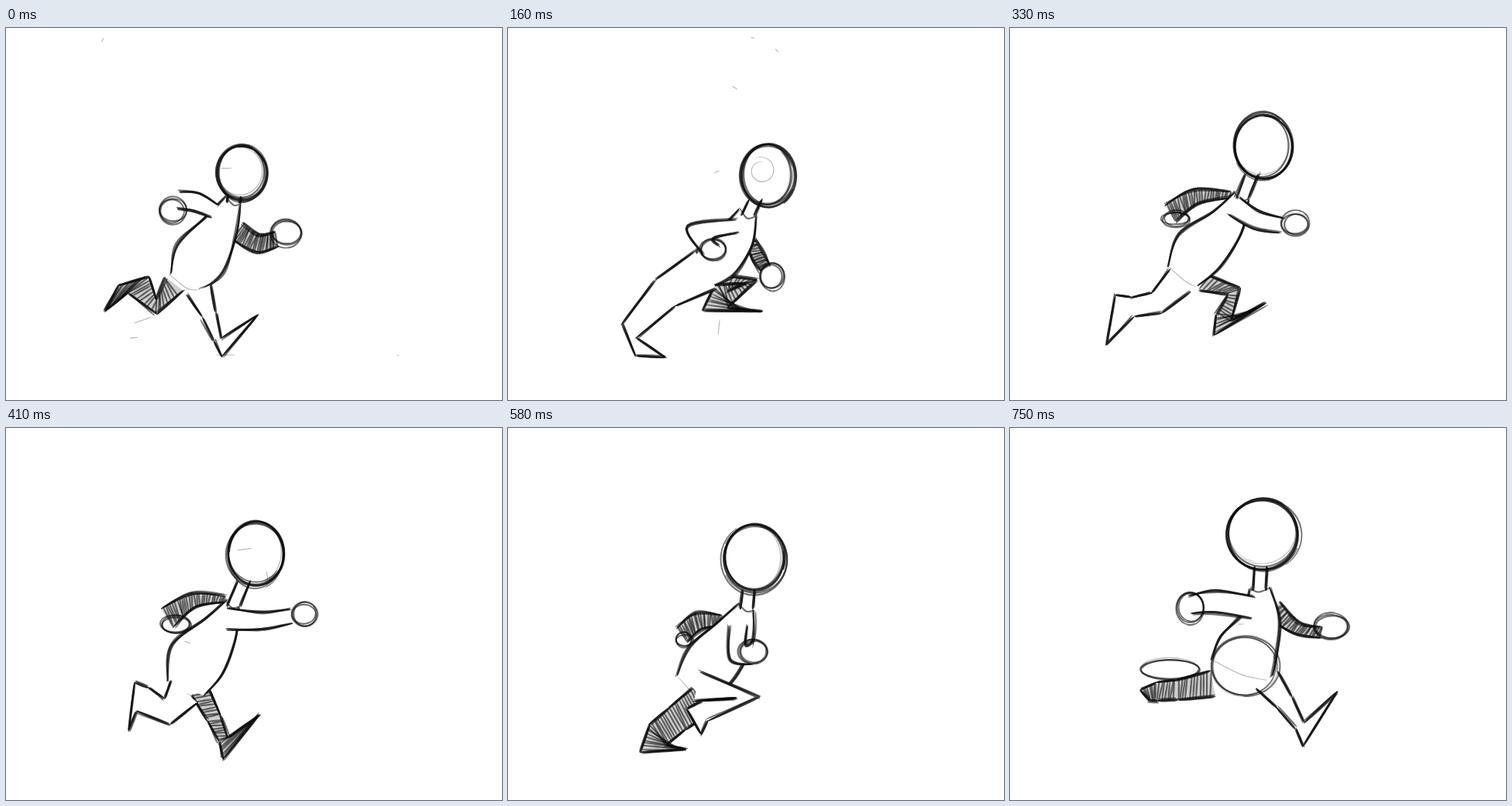
Recreate the animation shown at these times as an HTML page. Size 640x480 px, loop 830 ms.

```html
<!DOCTYPE html>
<html lang="en">
<head>
<meta charset="utf-8">
<title>Sketch run</title>
<style>
html, body { margin: 0; width: 100%; height: 100%; overflow: hidden; background: #fff; }
svg { display: block; width: 100vw; height: 100vh; }
</style>
</head>
<body>
<svg id="stage" viewBox="0 0 640 480"></svg>
<script>
const NS = 'http://www.w3.org/2000/svg';
const stage = document.getElementById('stage');
const BOLD = [3.2, .8], MID = [2.3, .58], THIN = [1.2, .3];

let seed = 7;
const rand = () => (seed = seed * 16807 % 2147483647) / 2147483647;
const wob = a => (rand() * 2 - 1) * a;
const mix = (a, b, t) => a + (b - a) * t;
const mid = (p, q, t) => [mix(p[0], q[0], t), mix(p[1], q[1], t)];
const toPath = pts => 'M' + pts.map(p => p[0].toFixed(1) + ' ' + p[1].toFixed(1)).join('L') + 'Z';

function add(parent, tag, attrs) {
  const el = document.createElementNS(NS, tag);
  for (const k in attrs) el.setAttribute(k, attrs[k]);
  return parent.appendChild(el);
}

function unit(p, q) {
  const dx = q[0] - p[0], dy = q[1] - p[1], len = Math.hypot(dx, dy) || 1;
  return [dx / len, dy / len];
}

// Catmull-Rom curve through the points.
function curve(p) {
  const out = [], at = i => p[Math.max(0, Math.min(p.length - 1, i))];
  for (let i = 0; i < p.length - 1; i++) {
    const [a, b, c, d] = [at(i - 1), at(i), at(i + 1), at(i + 2)];
    for (let s = 0; s < 8; s++) {
      const t = s / 8;
      out.push([0, 1].map(k => b[k] + .5 * t * (c[k] - a[k]
        + t * (2 * a[k] - 5 * b[k] + 4 * c[k] - d[k]
        + t * (3 * (b[k] - c[k]) + d[k] - a[k])))));
    }
  }
  out.push(at(p.length));
  return out;
}

// Tapered ink line.
function ink(g, pts, [w, alpha]) {
  const n = pts.length - 1, left = [], right = [];
  pts.forEach(([x, y], i) => {
    const [dx, dy] = unit(pts[Math.max(0, i - 1)], pts[Math.min(n, i + 1)]);
    const r = w / 2 * (.35 + .65 * Math.sqrt(Math.sin(Math.PI * i / n) + 1e-9));
    left.push([x - dy * r, y + dx * r]);
    right.unshift([x + dy * r, y - dx * r]);
  });
  add(g, 'path', { d: toPath(left.concat(right)), fill: '#0c0c0c', 'fill-opacity': alpha });
}

const pass = (g, pts, pen, j) => ink(g, curve(pts.map(([x, y]) => [x + wob(j), y + wob(j)])), pen);

function sketch(g, pts) {
  pass(g, pts, BOLD, .4);
  pass(g, pts, MID, 2);
  pass(g, pts, MID, 2.8);
}

function ring(g, [cx, cy, rx, ry], pens) {
  for (const pen of pens) {
    const x = cx + wob(1.6), y = cy + wob(1.6), start = rand() * 6.28;
    const a = rx + wob(2.2), b = ry + wob(2.2), pts = [];
    for (let s = 0; s <= 48; s++) {
      const t = start + s / 7, k = 1 + (s - 24) / 1000;
      pts.push([x + a * k * Math.cos(t), y + b * k * Math.sin(t)]);
    }
    ink(g, pts, pen);
  }
}

// Both edges of a tapering limb given as x, y, width per joint.
function edges(v) {
  const joints = [], back = [], front = [];
  for (let i = 0; i < v.length; i += 3) joints.push(v.slice(i, i + 3));
  joints.forEach((p, i) => {
    const before = i ? unit(joints[i - 1], p) : [0, 0];
    const after = joints[i + 1] ? unit(p, joints[i + 1]) : [0, 0];
    const [dx, dy] = unit([0, 0], [before[0] + after[0], before[1] + after[1]]);
    const r = p[2] / 2;
    back.push([p[0] - dy * r, p[1] + dx * r]);
    front.push([p[0] + dy * r, p[1] - dx * r]);
  });
  return [back, front];
}

function shade(g, a, b) {
  add(g, 'path', { d: toPath(a.concat([...b].reverse())), fill: '#222', 'fill-opacity': .22 });
  for (let i = 0; i < a.length - 1; i++) {
    const n = 3 + Math.round(Math.hypot(a[i + 1][0] - a[i][0], a[i + 1][1] - a[i][1]) / 6);
    for (let s = 0; s < n; s++) {
      const p = mid(a[i], a[i + 1], s / n), q = mid(b[i], b[i + 1], Math.min(1, (s + 1.6) / n));
      pass(g, [p, q], MID, 1.4);
    }
  }
}

const cover = (g, pts) => add(g, 'path', { d: toPath(pts), fill: '#fff' });

function arm(g, v, hand, dark) {
  const [a, b] = edges(v).map(curve);
  if (dark) {
    const thin = pts => pts.filter((p, i) => i % 4 === 0);
    shade(g, thin(a), thin(b));
  } else {
    cover(g, a.concat([...b].reverse()));
  }
  edges(v).forEach(e => sketch(g, e));
  ring(g, hand, [MID, MID, MID]);
}

function leg(g, v, foot, dark) {
  const [a, b] = edges(v), heel = foot.slice(0, 2), toe = foot.slice(2);
  const sole = [a[2], heel, toe, b[2]];
  if (dark) {
    shade(g, a, b);
    shade(g, [a[2], heel], [b[2], toe]);
  } else {
    cover(g, [...a, heel, toe, ...[...b].reverse()]);
  }
  [a, b, sole].forEach(line => line.slice(1).forEach((p, i) => sketch(g, [line[i], p])));
}

function torso(g, v, head) {
  const [a, b] = edges(v);
  cover(g, curve(a).concat(curve(b).reverse()));
  sketch(g, a);
  sketch(g, b);
  pass(g, [a[3], [(a[3][0] + b[3][0]) / 2, (a[3][1] + b[3][1]) / 2 + 6], b[3]], THIN, 2);
  const [dx, dy] = unit(v, head);
  const top = [head[0] - dx * head[2] * .96, head[1] - dy * head[3] * .96];
  for (const side of [-8, 8]) sketch(g, [[top[0] + side, top[1] - 2], [v[0] + side, v[1] + 4]]);
  pass(g, [a[0], [v[0], v[1] + 6], b[0]], MID, 1.5);
}

function figure(p) {
  const g = add(stage, 'g', { display: 'none' });
  arm(g, p.farArm, p.farHand, true);
  leg(g, p.farLeg, p.farFoot, true);
  torso(g, p.torso, p.head);
  leg(g, p.leg, p.foot, false);
  arm(g, p.arm, p.hand, false);
  const [x, y, rx, ry] = p.head;
  ring(g, p.head, [BOLD, MID, MID, MID]);
  ring(g, [x - 1, y - 2, rx - 3, ry - 3], [MID, THIN]);
  (p.rings || []).forEach(r => ring(g, r, [MID, THIN, MID]));
  (p.ticks || []).forEach(([tx, ty, dx, dy]) => pass(g, [[tx, ty], [tx + dx, ty + dy]], THIN, .2));
  if (p.swirl) {
    const pts = [];
    for (let t = 0; t < 7; t += .3) pts.push([327 + (18 - t) * Math.cos(t - 2), 184 + (18 - t) * Math.sin(t - 2)]);
    ink(g, pts, THIN);
  }
  return g;
}

function between(p, q) {
  const out = {};
  for (const k in p) {
    if (q[k] && typeof p[k][0] === 'number') out[k] = p[k].map((n, i) => mix(n, q[k][i], .5));
  }
  return out;
}

const strideA = {
  head: [304, 186, 32, 36], torso: [293, 222, 22, 277, 256, 46, 250, 297, 68, 232, 328, 44],
  arm: [270, 237, 18, 246, 225, 24, 222, 222, 22], hand: [215, 235, 17, 16],
  farArm: [299, 262, 26, 325, 278, 24, 349, 272, 20], farHand: [362, 264, 19, 17],
  leg: [249, 338, 33, 262, 370, 18, 273, 402, 10], foot: [279, 424, 325, 370],
  farLeg: [217, 330, 28, 194, 360, 18, 171, 331, 34], farFoot: [145, 332, 128, 365],
  ticks: [[126, 13, -3, 5], [277, 181, 14, 0], [165, 381, 23, -8], [160, 400, 10, -1], [271, 422, 24, 0], [505, 422, 2, 1]]
};
const pushA = {
  head: [335, 191, 35, 39], torso: [309, 238, 24, 296, 268, 46, 272, 298, 56, 250, 316, 46],
  arm: [296, 255, 16, 248, 264, 36, 262, 287, 22], hand: [264, 286, 16, 13],
  farArm: [313, 274, 12, 322, 295, 16, 332, 310, 14], farHand: [340, 320, 14, 16],
  leg: [255, 312, 56, 203, 342, 42, 156, 391, 26], foot: [165, 423, 203, 425],
  farLeg: [282, 330, 20, 314, 327, 16, 276, 346, 34], farFoot: [251, 365, 328, 366],
  ticks: [[313, 12, 5, 1], [345, 27, 4, 4], [289, 75, 7, 4], [266, 187, 7, -3], [273, 376, -2, 20]], swirl: true
};
const launchA = {
  head: [332, 143, 39, 43], torso: [306, 206, 22, 284, 242, 46, 242, 276, 62, 214, 305, 38],
  arm: [292, 212, 26, 306, 247, 26, 333, 267, 20], hand: [351, 266, 17, 15],
  farArm: [286, 209, 8, 238, 213, 22, 206, 234, 24], farHand: [207, 240, 17, 9],
  leg: [210, 312, 34, 170, 344, 24, 141, 370, 16], foot: [106, 361, 90, 427],
  farLeg: [245, 314, 22, 311, 306, 18, 270, 345, 30], farFoot: [247, 365, 333, 340],
  ticks: [[203, 190, 25, -8], [258, 182, 10, 1], [228, 280, 12, -4], [289, 124, 23, 10], [253, 262, 15, -4]]
};
const strideB = {
  head: [322, 163, 37, 42], torso: [293, 226, 18, 277, 258, 46, 247, 298, 74, 232, 336, 50],
  arm: [285, 247, 28, 330, 248, 22, 368, 243, 18], hand: [385, 241, 16, 14],
  farArm: [284, 221, 8, 242, 222, 18, 208, 245, 28], farHand: [220, 253, 18, 10],
  leg: [230, 340, 44, 208, 366, 34, 176, 350, 34], foot: [166, 328, 158, 390],
  farLeg: [251, 340, 24, 268, 374, 18, 281, 402, 12], farFoot: [280, 427, 327, 370],
  ticks: [[298, 158, 20, -3], [230, 275, 8, 3], [336, 185, 2, 10]]
};
const crouchB = {
  head: [334, 172, 37, 43], torso: [310, 228, 16, 288, 268, 56, 250, 306, 74, 228, 345, 50],
  arm: [292, 270, 18, 318, 304, 20, 348, 288, 18], hand: [350, 286, 10, 11],
  farArm: [286, 240, 14, 238, 226, 26, 202, 246, 28], farHand: [207, 257, 16, 12],
  leg: [238, 342, 34, 284, 365, 30, 222, 364, 24], foot: [200, 346, 198, 402],
  farLeg: [275, 372, 38, 265, 392, 34, 254, 408, 26], farFoot: [234, 421, 330, 420],
  rings: [[331, 170, 23, 29]], ticks: [[225, 248, 45, 0], [240, 298, 25, 5]]
};
const launchB = {
  head: [301, 165, 44, 46], torso: [305, 232, 26, 296, 262, 48, 274, 302, 66, 250, 326, 54],
  arm: [302, 240, 30, 276, 274, 34, 282, 293, 40], hand: [282, 291, 25, 19],
  farArm: [266, 256, 14, 254, 272, 18, 246, 288, 14], farHand: [247, 288, 8, 5],
  leg: [250, 325, 42, 336, 330, 30, 285, 366, 30], foot: [262, 380, 300, 388],
  farLeg: [226, 330, 40, 172, 358, 38, 132, 383, 42], farFoot: [106, 416, 130, 410],
  ticks: [[425, 337, -22, 36], [403, 373, -28, 21], [355, 360, 30, -15], [337, 238, -10, 24], [282, 400, 46, -10]]
};
const leapB = {
  head: [326, 137, 47, 45], torso: [322, 206, 26, 324, 243, 48, 308, 282, 76, 298, 312, 82],
  arm: [314, 232, 28, 265, 224, 28, 232, 228, 22], hand: [232, 232, 18, 19],
  farArm: [340, 234, 26, 370, 258, 16, 402, 264, 14], farHand: [415, 257, 20, 16],
  leg: [332, 325, 36, 354, 354, 24, 374, 384, 14], foot: [378, 411, 422, 340],
  farLeg: [262, 330, 34, 215, 338, 26, 190, 340, 24], farFoot: [168, 338, 180, 352],
  rings: [[302, 308, 43, 38], [206, 311, 38, 13]], ticks: [[294, 253, 8, 0]]
};

const cycle = [
  strideA, between(strideA, pushA), pushA, launchA, between(launchA, strideB),
  strideB, crouchB, between(crouchB, launchB), launchB, leapB
];
// Holds alternate between 80 and 90 ms after the two opening poses.
const starts = cycle.map((p, i) => i * 80 + 10 * Math.floor(i / 3));
const LOOP = 830;

add(stage, 'rect', { width: 640, height: 480, fill: '#fff' });
const groups = cycle.map(figure);

let shown = -1;
function show(ms) {
  const t = ms % LOOP;
  let now = cycle.length - 1;
  while (starts[now] > t) now--;
  if (now === shown) return;
  groups.forEach((g, i) => g.setAttribute('display', i === now ? 'inline' : 'none'));
  shown = now;
}

const begin = performance.now();
function tick() {
  show(performance.now() - begin);
  requestAnimationFrame(tick);
}
tick();
</script>
</body>
</html>
```
